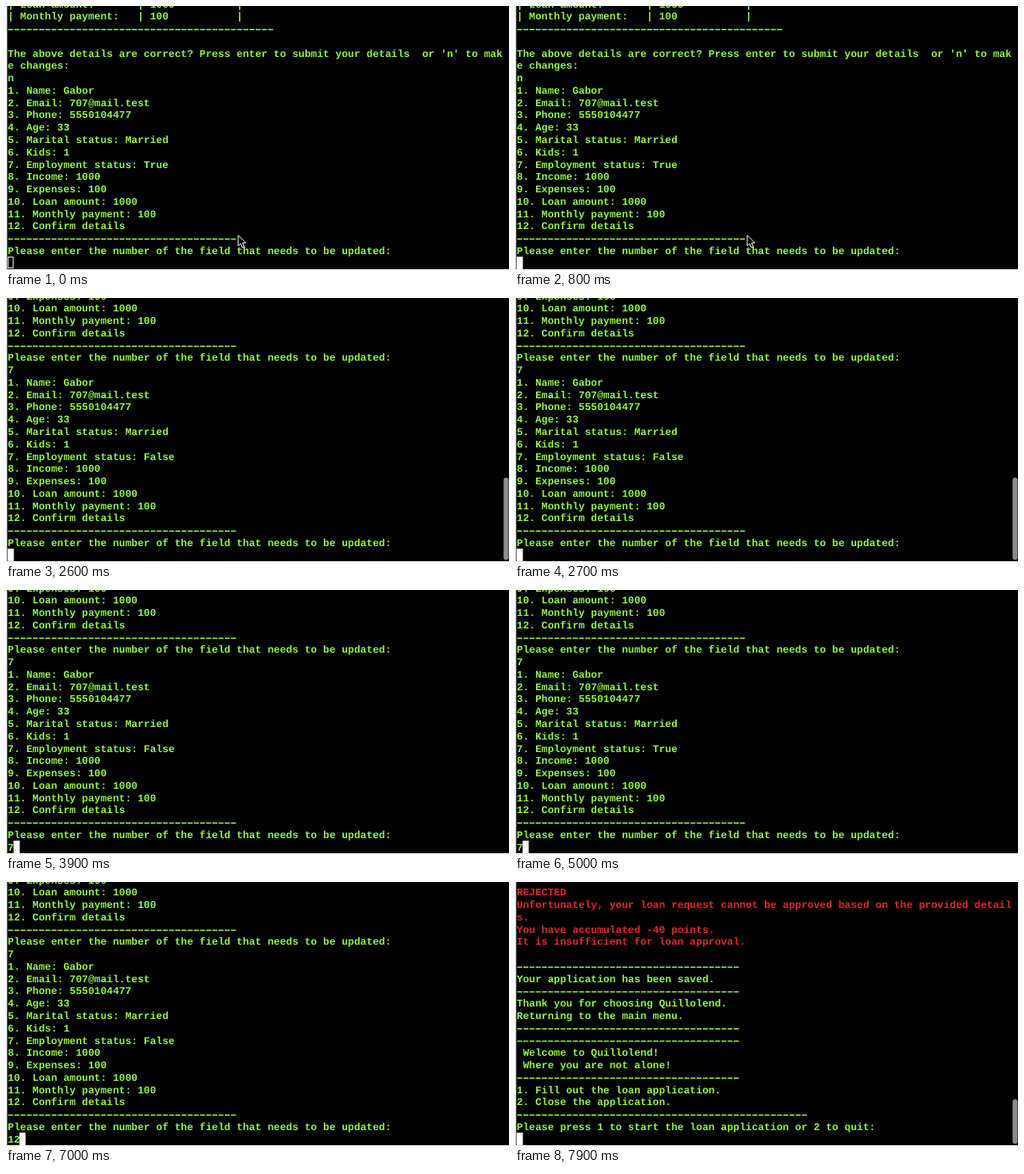
These frames come from a looping animation (600 px wide and 316 px high, 8000 ms). An HTML page:

```html
<!DOCTYPE html>
<html lang="en">
<head>
<meta charset="utf-8">
<title>Loan application terminal</title>
<style>
  html, body { margin: 0; width: 100%; height: 100%; overflow: hidden; background: #000; }
  svg { display: block; }
  text {
    font: bold 12.3px "Liberation Mono", "Courier New", monospace;
    white-space: pre;
    text-rendering: geometricPrecision;
  }
</style>
</head>
<body>
<svg id="stage" width="600" height="316" viewBox="0 0 600 316">
  <rect width="600" height="316"/>
  <g id="rows"></g>
  <text id="typed" x="2" y="311.6" fill="#92f442"></text>
  <rect id="caret" y="300" width="7.4" height="15" fill="#fff"/>
  <rect id="hollow" x="2.5" y="300.5" width="6" height="13" fill="none" stroke="#e4e4e4"/>
  <rect width="1.4" height="316" fill="#f0f0f0"/>
  <rect y="315" width="600" height="1" fill="#f0f0f0"/>
  <rect id="bar" x="593.5" width="6" rx="3" fill="#8c8c8c"/>
  <path id="pointer" d="M277 274.5v12.6l2.9-2.7 2 4.8 2.3-1-2-4.6h4z" fill="#000" stroke="#fff"/>
</svg>
<script>
const LOOP = 8000, COL = 7.381, ROW = 14.76, LEFT = 2, BASE = 16.4;
const GREEN = '#92f442', RED = '#e02828';
const $ = id => document.getElementById(id);
const rule = n => '-'.repeat(n);

const fields = employed => [
  '1. Name: Gabor', '2. Email: 707@mail.test', '3. Phone: 5550104477', '4. Age: 33',
  '5. Marital status: Married', '6. Kids: 1', '7. Employment status: ' + employed,
  '8. Income: 1000', '9. Expenses: 100', '10. Loan amount: 1000',
  '11. Monthly payment: 100', '12. Confirm details', rule(37),
  'Please enter the number of the field that needs to be updated:'
];

// Every screen begins with the row that is cut off by the top edge.
const first = [
  '| Loan amount:       | 1000          |',
  '| Monthly payment:   | 100           |',
  rule(43), '',
  "The above details are correct? Press enter to submit your details  or 'n' to mak",
  'e changes:', 'n', ...fields('True')
];
const update = employed => [...fields('').slice(8), '7', ...fields(employed)];
const result = [
  '', '!REJECTED',
  '!Unfortunately, your loan request cannot be approved based on the provided detail',
  '!s.', '!You have accumulated -40 points.', '!It is insufficient for loan approval.', '',
  rule(36), 'Your application has been saved.', rule(36),
  'Thank you for choosing Quillolend.', 'Returning to the main menu.', rule(36), rule(36),
  ' Welcome to Quillolend!', ' Where you are not alone!', rule(36),
  '1. Fill out the loan application.', '2. Close the application.', rule(47),
  'Please press 1 to start the loan application or 2 to quit:'
];

const screens = [
  { at: 0, rows: first },
  { at: 2500, rows: update('False'), barTop: 215 },
  { at: 4200, rows: update('True'), barTop: 224 },
  { at: 5400, rows: update('False'), barTop: 231 },
  { at: 7600, rows: result, barTop: 260 }
];
const typing = [
  [0, ''], [1500, '7'], [2500, ''], [3800, '7'], [4200, ''],
  [4800, '7'], [5400, ''], [6200, '1'], [6500, '12'], [7600, '']
];
const FOCUS = 700, HIDE_POINTER = 1500;

function add(tag, attrs) {
  const el = document.createElementNS('http://www.w3.org/2000/svg', tag);
  for (const key in attrs) el.setAttribute(key, attrs[key]);
  $('rows').append(el);
  return el;
}

function drawRow(row, i) {
  const y = BASE + (i - 1) * ROW;
  if (/^-+$/.test(row)) {
    add('line', {
      x1: LEFT + 0.6, x2: LEFT + row.length * COL, y1: y - 3, y2: y - 3,
      stroke: GREEN, 'stroke-width': 1.5, 'stroke-dasharray': `6 ${COL - 6}`
    });
  } else if (row) {
    const red = row[0] === '!';
    add('text', { x: LEFT, y, fill: red ? RED : GREEN }).textContent = red ? row.slice(1) : row;
  }
}

const show = (id, on) => $(id).setAttribute('visibility', on ? 'visible' : 'hidden');
let shown;

function render(t) {
  const screen = screens.findLast(s => t >= s.at);
  if (screen !== shown) {
    shown = screen;
    $('rows').replaceChildren();
    screen.rows.forEach(drawRow);
  }

  const input = typing.findLast(([at]) => t >= at)[1];
  $('typed').textContent = input;
  $('caret').setAttribute('x', Math.floor(LEFT + input.length * COL));
  show('caret', t >= FOCUS);
  show('hollow', t < FOCUS);
  show('pointer', t < HIDE_POINTER);

  // The scrollbar holds briefly after each scroll, then fades.
  const top = screen.barTop;
  const fade = 1 - (t - screen.at - 500) / 250;
  $('bar').setAttribute('opacity', top ? Math.max(0, Math.min(1, fade)) : 0);
  $('bar').setAttribute('y', top || 0);
  $('bar').setAttribute('height', top ? 313.5 - top : 0);
}

const start = performance.now();
function tick(now) {
  render(Math.max(0, now - start) % LOOP);
  requestAnimationFrame(tick);
}
render(0);
requestAnimationFrame(tick);
</script>
</body>
</html>
```
